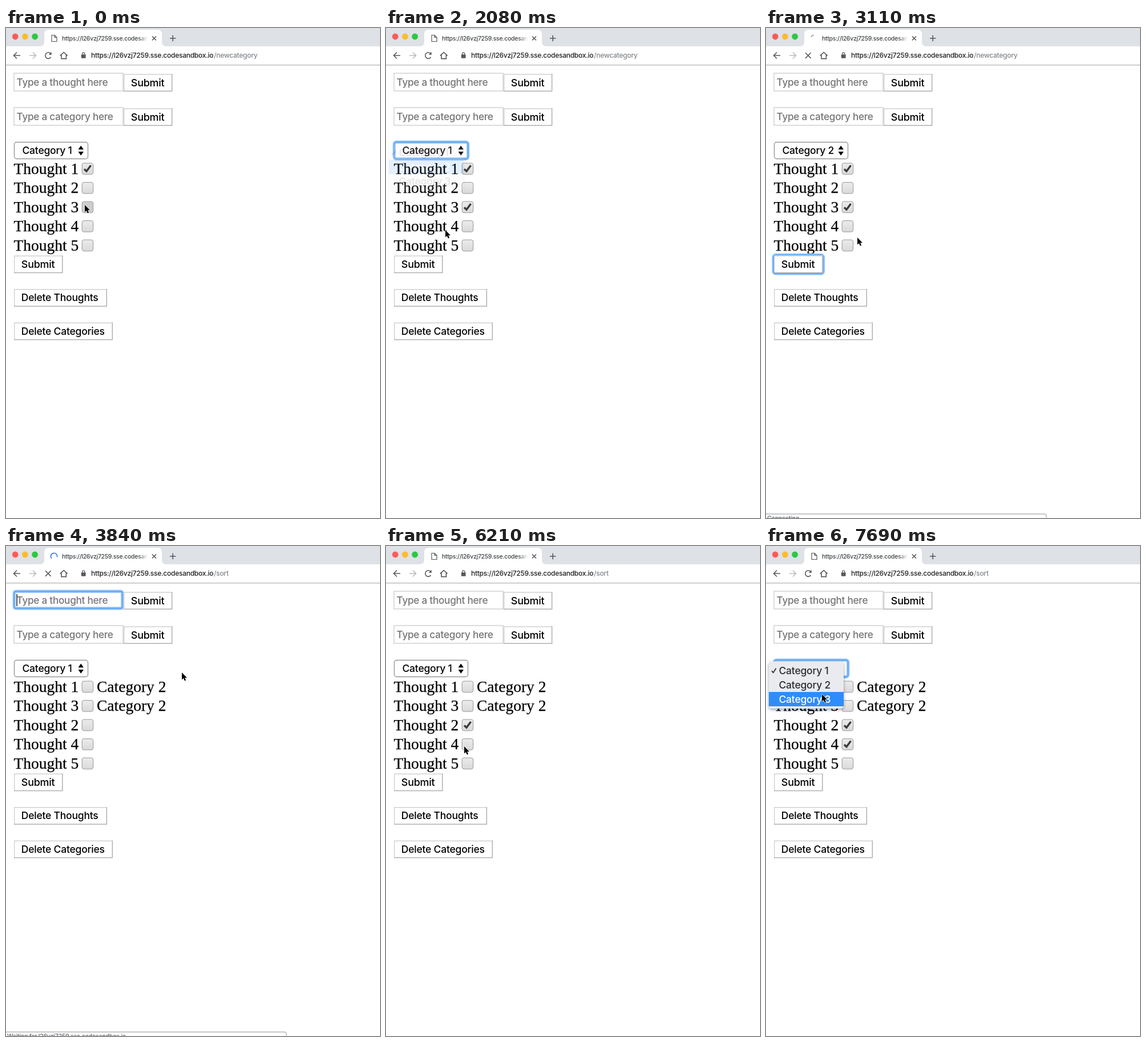
An HTML page for the animation above (7.99 s loop, 655 by 856 pixels).

```html
<!DOCTYPE html>
<html lang="en">
<head>
<meta charset="utf-8">
<title>Thought sorter</title>
<style>
  html, body { margin: 0; width: 100%; height: 100%; overflow: hidden; background: #fff; }
  svg { display: block; width: 100vw; height: 100vh; }
  text { white-space: pre; }
  .ui { font: 500 17.5px Inter, "Open Sans", sans-serif; letter-spacing: -.22px; }
  .send { font-size: 17.9px; }
  .hint { font-size: 17.2px; letter-spacing: -.27px; }
  .page { font: 27.5px "Liberation Serif", "Times New Roman", serif; stroke: #000; stroke-width: .25; }
  .url { font: 500 12px Inter, sans-serif; letter-spacing: -.26px; }
  .title { font: 500 10.4px Inter, sans-serif; letter-spacing: -.23px; }
  .status { font: 500 10.6px Inter, sans-serif; letter-spacing: -.26px; }
  .line { fill: none; stroke: #55585c; stroke-width: 1.6; }
</style>
</head>
<body>
<svg viewBox="0 0 655 856" xmlns="http://www.w3.org/2000/svg">
  <defs>
    <linearGradient id="fade"><stop stop-color="#fff" stop-opacity="0"/><stop offset="1" stop-color="#fff"/></linearGradient>
    <linearGradient id="box" x2="0" y2="1"><stop stop-color="#ececec"/><stop offset="1" stop-color="#d9d9d9"/></linearGradient>
    <filter id="shadow" x="-20%" y="-20%" width="140%" height="150%"><feDropShadow dx="0" dy="2" stdDeviation="2.5" flood-opacity=".38"/></filter>
    <filter id="soft" x="-10%" y="-30%" width="120%" height="160%"><feGaussianBlur stdDeviation=".6"/></filter>
  </defs>
  <rect width="655" height="856" fill="#fff"/>

  <!-- browser chrome -->
  <rect width="655" height="32" fill="#dee1e6"/>
  <path d="M59 32q8 0 8-8V11q0-8 8-8H265q8 0 8 8V24q0 8 8 8Z" fill="#fff"/>
  <circle cx="16.2" cy="15" r="5.4" fill="#fc5b57"/>
  <circle cx="33.4" cy="15" r="5.4" fill="#fdbb2d"/>
  <circle cx="50.6" cy="15" r="5.4" fill="#2bc840"/>
  <path id="doc" class="line" style="stroke-width:1.2" d="M80 12.5h5l4 4v7h-9ZM85 12.5v4h4"/>
  <path id="spinner" fill="none" stroke-width="1.7"/>
  <text class="title" x="98" y="21.8" fill="#3c4043">https://l26vzj7259.sse.codesan</text>
  <rect x="232" y="8" width="17" height="20" fill="url(#fade)"/>
  <rect x="248.5" y="8" width="5" height="20" fill="#fff"/>
  <path class="line" d="M256 14.5l7 7m0-7l-7 7"/>
  <path class="line" d="M287 18h10.4M292.2 12.8v10.4"/>
  <path class="line" d="M25 48H14M19 42.5L13.5 48l5.5 5.5"/>
  <path class="line" style="stroke:#b9bbbe" d="M41 48h11M47 42.5l5.5 5.5-5.5 5.5"/>
  <g id="reload"><path class="line" d="M78.5 51a5.3 5.3 0 1 1-.8-6.8"/><path d="M79.7 41.8v5h-5Z" fill="#55585c"/></g>
  <path id="stop" class="line" d="M69 43.3l9.6 9.6m0-9.6l-9.6 9.6"/>
  <path class="line" d="M94.8 48.3l6.4-5.8 6.4 5.8M97 47v6.6h8.4V47"/>
  <rect x="131.8" y="46.3" width="7.8" height="6.4" rx="1" fill="#55585c"/>
  <path class="line" style="stroke-width:1.3" d="M133.6 46.5v-1.6a2.1 2.1 0 0 1 4.2 0v1.6"/>
  <text class="url" x="149" y="52.3" fill="#202124">https://l26vzj7259.sse.codesandbox.io</text>
  <text id="path" class="url" x="364" y="52.3" fill="#80868b"></text>
  <rect y="64" width="655" height="1.4" fill="#b9bbbe"/>

  <g id="form"></g>
  <g id="menu">
    <rect x="5" y="201.5" width="131" height="82.5" rx="5" fill="#e9ebee" filter="url(#shadow)"/>
    <rect id="hover" x="5" width="131" height="25" fill="#2f8cfb"/>
  </g>
  <g id="status">
    <path d="M-1 849H487q4 0 4 4v5H-1Z" fill="#fff" stroke="#b4b6b9" stroke-width="1.3"/>
    <text id="statusText" class="status" x="2" y="860.3" fill="#5f6368"></text>
  </g>
  <path id="cursor" d="M0 0V12.6L2.8 10L4.9 14.6L7.1 13.6L5.1 9.2H9Z" fill="#000" stroke="#fff" stroke-width="1.1" paint-order="stroke" stroke-linejoin="round"/>
</svg>
<script>
const LOOP = 7990, TICK = 147.96;
const $ = id => document.getElementById(id);
const form = $('form'), menu = $('menu');

function add(parent, tag, attrs, text) {
  const el = document.createElementNS('http://www.w3.org/2000/svg', tag);
  for (const name in attrs) el.setAttribute(name, attrs[name]);
  if (text) el.textContent = text;
  return parent.appendChild(el);
}
const show = (el, on) => el.setAttribute('visibility', on ? 'visible' : 'hidden');
const label = (x, y, text, fill = '#000', cls = 'ui') => add(form, 'text', { x, y, fill, class: cls }, text);

// focus glow: a pale halo around a stronger core
function ring(x, y, width, height, rx) {
  const g = add(form, 'g', { fill: 'none', filter: 'url(#soft)' });
  add(g, 'rect', { x, y, width, height, rx, stroke: '#9dcbfb', 'stroke-width': 5.4 });
  add(g, 'rect', { x, y, width, height, rx, stroke: '#66abf5', 'stroke-width': 2.4 });
  return g;
}
function field(y, hint) {
  add(form, 'rect', { x: 14, y, width: 191, height: 31, fill: '#fff', stroke: '#cfcfcf', 'stroke-width': 1.4 });
  label(18.5, y + 22.3, hint, '#757575', 'ui hint');
}
function button(x, y, width, text) {
  add(form, 'rect', { x, y, width, height: 30.5, fill: '#fff' });
  add(form, 'path', { d: `M${x + .7} ${y + 30}V${y + .7}H${x + width}`, fill: 'none', stroke: '#d2d2d2', 'stroke-width': 1.5 });
  add(form, 'path', { d: `M${x} ${y + 30}H${x + width - .7}V${y}`, fill: 'none', stroke: '#b0b0b0', 'stroke-width': 1.5 });
  label(x + 12.8, y + 21.3, text, '#000', text === 'Submit' ? 'ui send' : 'ui');
}

field(79, 'Type a thought here');
const inputRing = ring(14.3, 79.3, 189.5, 29.7, 3);
const caret = add(form, 'rect', { x: 18.4, y: 84, width: 1.3, height: 21, fill: '#000' });
button(206, 80.3, 85.3, 'Submit');
field(139, 'Type a category here');
button(206, 140.3, 85.3, 'Submit');

add(form, 'rect', { x: 14.5, y: 199.5, width: 129, height: 29, rx: 4, fill: '#fff', stroke: '#989898', 'stroke-width': 1.4 });
const selectRing = ring(14.3, 199.3, 129.4, 29.4, 4);
const selected = label(28.5, 220.2, 'Category 1');
add(form, 'path', { d: 'M126.5 212.2l4.7-6.7 4.7 6.7ZM126.5 216l4.7 6.7 4.7-6.7Z' });

const rows = [0, 1, 2, 3, 4].map(i => {
  const y = 246 + 33.5 * i;
  const name = label(13.5, y + 8.7, '', '#000', 'page');
  const box = add(form, 'rect', { x: 133.2, y: y - 9.8, width: 19.4, height: 19.4, rx: 3.5, stroke: '#a9a9a9', 'stroke-width': 1.3 });
  const tick = add(form, 'path', { d: `M137 ${y + .5}L141 ${y + 4.3}L148.6 ${y - 6}`, fill: 'none', stroke: '#3b3b3b', 'stroke-width': 3.4 });
  const tag = label(159, y + 8.7, 'Category 2', '#000', 'page');
  return { name, box, tick, tag };
});

const submitRing = ring(13, 396.5, 87.5, 32.5, 4);
button(14, 397.5, 85.5, 'Submit');
button(14, 456, 163, 'Delete Thoughts');
button(14, 514.5, 173, 'Delete Categories');

const items = [0, 1, 2].map(i =>
  add(menu, 'text', { x: 22.5, y: 224 + 25 * i, class: 'ui' }, 'Category ' + (i + 1)));
const menuTick = add(menu, 'path', { d: 'M10 218l2.6 3.3 5-7.6', fill: 'none', 'stroke-width': 1.7 });

// pointer stops: tick, x, y
const route = [
  [0, 138, 309], [3, 138, 309], [5, 131, 280], [7, 115, 218], [8, 114, 213], [9, 114, 213],
  [10, 112, 225], [11, 110, 237], [12, 110, 237], [13, 107, 262], [14, 104, 353],
  [16, 88, 402], [17, 84, 407], [19, 84, 407], [20, 100, 402], [21, 160, 366],
  [23, 255, 275], [26, 308, 221], [28, 300, 228], [31, 160, 300], [33, 138, 311], [34, 138, 311],
  [37, 138, 345], [39, 137, 374], [42, 137, 350], [43, 137, 350],
  [45, 128, 270], [46, 115, 218], [47, 114, 213], [48, 114, 213],
  [50, 107, 238], [52, 98, 259], [60, 98, 259]
];
function pointer(k) {
  const i = route.findIndex(stop => stop[0] > k);
  const [k0, x0, y0] = route[i - 1], [k1, x1, y1] = route[i];
  const p = (k - k0) / (k1 - k0);
  return [x0 + (x1 - x0) * p, y0 + (y1 - y0) * p];
}
function arc(from, sweep) {
  const at = a => `${84 + 5.6 * Math.cos(a)} ${18 + 5.6 * Math.sin(a)}`;
  return `M${at(from)}A5.6 5.6 0 ${sweep > Math.PI ? 1 : 0} 1 ${at(from + sweep)}`;
}

function draw(t) {
  const k = Math.floor((t + 12) / TICK);          // the picture holds for each tick
  const within = (a, b) => k >= a && k < b;
  const sorted = k >= 25, loading = within(20, 28);
  const [x, y] = pointer(k);
  $('cursor').setAttribute('transform', `translate(${x} ${y})`);

  show($('doc'), !loading);
  show($('reload'), !loading);
  show($('stop'), loading);
  show($('spinner'), loading);
  $('spinner').setAttribute('stroke', sorted ? '#4a80d8' : '#a4a7ab');
  $('spinner').setAttribute('d', sorted ? arc(2.4 + (k - 26) * .9, 4.1) : arc(3.6 - (k - 21) * .8, 1.1));
  $('path').textContent = sorted ? '/sort' : '/newcategory';

  show($('status'), within(21, 29));
  $('statusText').textContent = k < 22 ? 'Connecting...' : 'Waiting for l26vzj7259.sse.codesandbox.io...';

  show(inputRing, within(25, 33));
  show(caret, within(25, 33) && (k - 25) % 7 < 4);
  show(selectRing, within(8, 19) || k >= 47);
  show(submitRing, within(19, 25));
  selected.textContent = within(15, 25) ? 'Category 2' : 'Category 1';

  const order = sorted ? [1, 3, 2, 4, 5] : [1, 2, 3, 4, 5];
  const checked = [!sorted, false, within(1, 25) || k >= 33, k >= 43, false];
  rows.forEach((row, i) => {
    row.name.textContent = 'Thought ' + order[i];
    row.box.setAttribute('fill', k === 0 && i === 2 ? '#cdcdcd' : 'url(#box)');
    show(row.tick, checked[i]);
    show(row.tag, sorted && i < 2);
  });

  menu.setAttribute('opacity', within(8, 14) || k >= 47 ? 1 : k === 14 ? .12 : 0);
  const over = within(12, 15) ? 1 : Math.max(0, Math.min(2, Math.floor((y - 205) / 25)));
  $('hover').setAttribute('y', 205 + 25 * over);
  items.forEach((item, i) => item.setAttribute('fill', i === over ? '#fff' : '#2b2c2e'));
  menuTick.setAttribute('stroke', over ? '#2b2c2e' : '#fff');
}

const start = performance.now();
function loop() {
  draw((performance.now() - start) % LOOP);
  requestAnimationFrame(loop);
}
loop();
</script>
</body>
</html>
```
